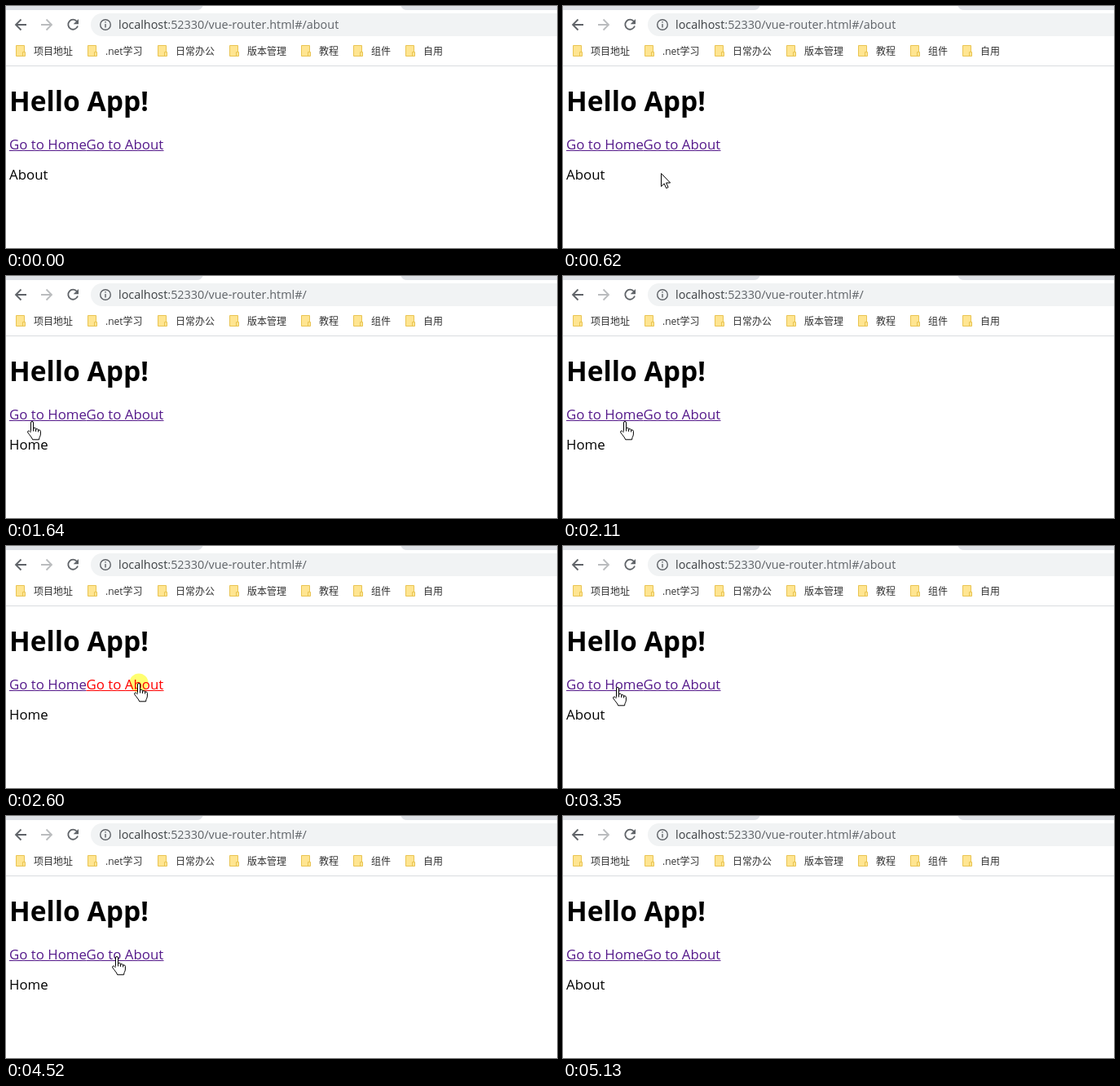
Animation, 676 px wide and 297 px high, one loop 5210 ms. Source, as an HTML page:

```html
<!DOCTYPE html>
<html lang="zh-CN">
<head>
<meta charset="utf-8">
<title>Hello App!</title>
<style>
  html, body { margin: 0; width: 100%; height: 100%; overflow: hidden; background: #fff; }
  svg { display: block; width: 676px; height: 297px; }
  text { font-family: "Open Sans", "Noto Sans CJK SC", "Noto Sans CJK", sans-serif; white-space: pre; }
  .url { font-size: 14.4px; fill: #5f6368; }
  .host { fill: #3c4043; }
  .mark { font-size: 12px; fill: #333; }
  .title { font-size: 33.6px; font-weight: 700; }
  .body { font-size: 16.83px; }
  .link { fill: #551a8b; stroke: #551a8b; }
  .link.active { fill: #f00; stroke: #f00; }
  .link text { stroke: none; }
  .icon { fill: none; stroke: #5f6368; stroke-width: 1.8; }
  .icon .off { stroke: #babcbe; }
  .icon .solid { fill: #5f6368; stroke: none; }
  .info { stroke-width: 1.4; }
  .folder { fill: #ffe591; stroke: #e9c452; }
  .cursor { fill: #fff; stroke: #000; stroke-linejoin: round; }
  #spot { fill: #ffff70; mix-blend-mode: multiply; }
</style>
</head>
<body>
<svg viewBox="0 0 676 297">
  <path fill="#dee1e6" d="M0 0H241.5A8 8 0 0 1 234 5H0ZM484.5 0A8 8 0 0 0 492 5H676V0Z"/>
  <rect x="104" y="9" width="600" height="28" rx="14" fill="#f1f3f4"/>
  <g class="icon">
    <path d="M25 23H12.5M18.5 16.5L12 23L18.5 29.5"/>
    <path class="off" d="M43 23H55.5M49.5 16.5L56 23L49.5 29.5"/>
    <path d="M87 19A6 6 0 1 0 88 24.5"/>
    <path class="solid" d="M89 16V22.3H82.7Z"/>
    <path class="info" d="M115.7 23a6.3 6.3 0 1 1 12.6 0a6.3 6.3 0 1 1 -12.6 0M122 22V26.5M122 19V20.5"/>
  </g>
  <text class="url" x="138" y="28"><tspan class="host">localhost</tspan>:52330/vue-router.html#/<tspan id="hash"></tspan></text>
  <g id="marks"></g>
  <path stroke="#dadce0" d="M0 73.5H676"/>
  <text class="title" x="4" y="129">Hello App!</text>
  <g class="link" id="home"><text class="body" x="4" y="176">Go to Home</text><path d="M4 177.5H98.5"/></g>
  <g class="link" id="about"><text class="body" x="98.5" y="176">Go to About</text><path d="M98.5 177.5H193.5"/></g>
  <text class="body" id="view" x="4" y="213"></text>
  <circle id="spot" r="11.5"/>
  <path class="cursor" id="arrow" d="M.5 .5V16.5L4.2 13L6.7 18.6L9.1 17.5L6.6 12H11.6Z"/>
  <path class="cursor" id="hand" d="M-1.5 12.5V2A1.5 1.5 0 0 1 1.5 2V9Q3.6 6.8 4.6 9.4V10Q6.8 8.6 7.6 11Q10 10.2 10.4 12.5V16C10.4 19 8.6 19.5 8.6 22.8H.6C0 20.3-2.7 17.9-5.2 14.1C-6.2 12.3-3.8 11.2-2.7 12.7L-1.5 14M1.5 9V12.5M4.6 10V13M7.6 11V13.5"/>
</svg>
<script>
const $ = id => document.getElementById(id);
const LOOP = 5210, STEP = 70, PRESS = 130, HIDE = 5130;

// Bookmarks flow from left to right, spaced by their label widths.
let markX = 12;
for (const label of ["项目地址", ".net学习", "日常办公", "版本管理", "教程", "组件", "自用"]) {
  $("marks").insertAdjacentHTML("beforeend", `
    <g transform="translate(${markX} 48)">
      <path class="folder" d="M.5 .5H10.5V8.5H11.5V13.5H.5ZM8.5 13.5V8.5H11"/>
      <text class="mark" x="22" y="12">${label}</text>
    </g>`);
  const text = $("marks").lastElementChild.querySelector("text");
  markX += Math.round(text.getComputedTextLength()) + 40;
}

// Pointer stops: time, x, y.
const stops = [[200, 496, 266], [690, 85, 199], [1170, 32, 178], [1630, 32, 178], [2110, 76, 178],
  [2600, 163, 168], [2800, 163, 168], [3350, 67, 173], [3490, 63, 179], [3620, 63, 179],
  [3820, 17, 184], [4170, 44, 199], [4590, 146, 169], [4850, 146, 169], [5060, 199, 209]];
const presses = [1500, 2600, 3490, 4590];

const ease = k => (k + Math.sin(k * Math.PI / 2)) / 2;

// The pointer moves in steps, counted from the stop it left last.
function pointerAt(time) {
  if (time < stops[0][0] || time >= HIDE) return null;
  const i = stops.findLastIndex(s => s[0] <= time);
  const [t0, x0, y0] = stops[i];
  const [t1, x1, y1] = stops[i + 1] || [LOOP, x0, y0];
  const k = ease(Math.floor((time - t0) / STEP) * STEP / (t1 - t0));
  return { x: Math.round(x0 + (x1 - x0) * k), y: Math.round(y0 + (y1 - y0) * k) };
}

function place(id, pos, visible) {
  $(id).style.display = visible ? "" : "none";
  if (visible) $(id).setAttribute("transform", `translate(${pos.x} ${pos.y})`);
}

function render(time) {
  const pos = pointerAt(time);
  const overLink = pos !== null && pos.x >= 4 && pos.x < 194 && pos.y > 158 && pos.y < 182;
  const pressed = presses.some(t => time >= t && time < t + PRESS);
  const clicks = presses.filter(t => time >= t + PRESS).length;
  const onHome = clicks % 2 === 1;

  $("view").textContent = onHome ? "Home" : "About";
  $("hash").textContent = onHome ? "" : "about";
  $("home").classList.toggle("active", pressed && !onHome);
  $("about").classList.toggle("active", pressed && onHome);
  place("spot", pos, pressed);
  place("hand", pos, overLink);
  place("arrow", pos, pos !== null && !overLink);
}

const start = performance.now();
function loop() {
  render((performance.now() - start) % LOOP);
  requestAnimationFrame(loop);
}
loop();
</script>
</body>
</html>
```
